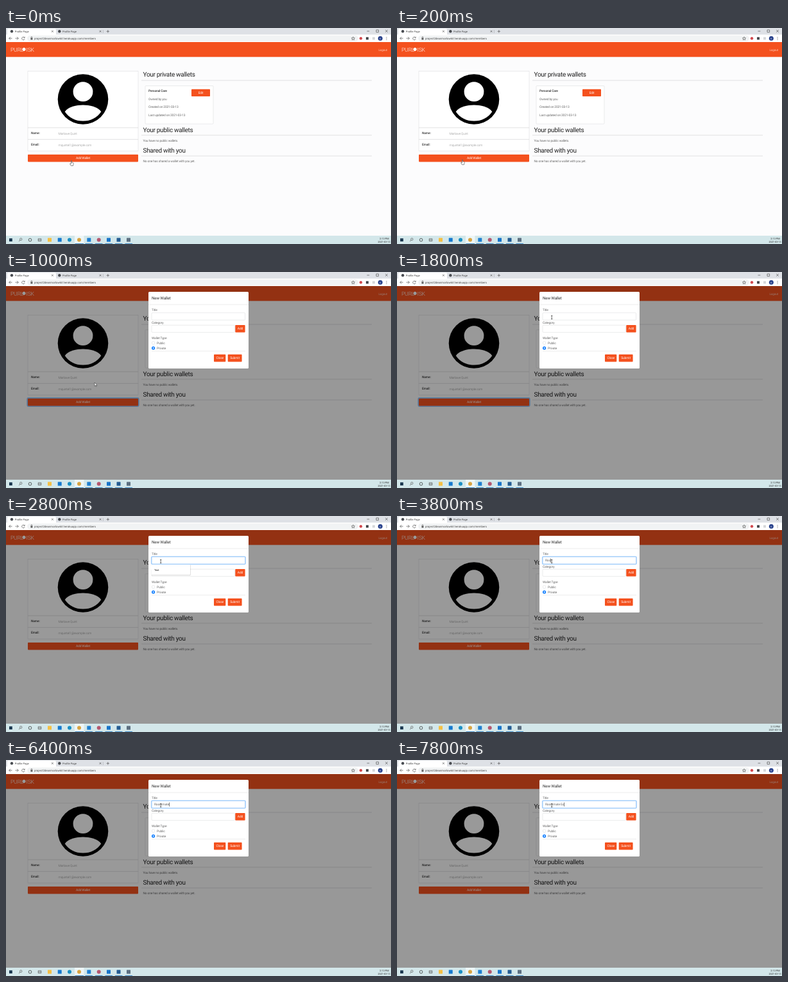
Animation of 600 by 338 pixels, one loop 8 s. Source, as an HTML page:

```html
<!DOCTYPE html>
<html lang="en">
<head>
<meta charset="utf-8">
<title>New wallet</title>
<style>
  html, body { margin: 0; width: 100%; height: 100%; overflow: hidden; background: #fcfcfd; }
  svg { display: block; width: 100vw; height: 100vh; }
  text { font-family: Roboto, "Open Sans", sans-serif; font-size: 4.9px; letter-spacing: -.03em;
    text-rendering: geometricPrecision; fill: #666; white-space: pre; }
  .ui { font-size: 4.2px; letter-spacing: 0; fill: #444; }
  .h { font-size: 10px; fill: #222; }
  .b { fill: #333; font-weight: 500; }
  .pale { fill: #888; font-weight: 300; }
  .w { fill: #fff; text-anchor: middle; }
  .btn { fill: #f4511e; }
  .line { stroke: #d4d4d6; stroke-width: .7; fill: none; }
  .box { fill: #fff; stroke: #dcdde0; stroke-width: .6; }
  .ico { fill: none; stroke: #555; stroke-width: .7; }
</style>
</head>
<body>
<svg viewBox="0 0 600 338" preserveAspectRatio="none">
  <rect width="600" height="338" fill="#fcfcfd"/>

  <g id="page">
    <rect y="22" width="600" height="23.3" class="btn"/>
    <g style="font-size:9px">
      <text x="7" y="37" style="font-size:8.6px;fill:#fff;font-weight:300">PURL</text>
      <circle cx="28" cy="33.3" r="2.6" fill="#fff"/>
      <text x="31.6" y="37" style="font-size:8.6px;fill:#fff;font-weight:300">ISK</text>
    </g>
    <text x="594" y="35.5" text-anchor="end" style="font-size:4.6px;fill:#ffd0c0">Logout</text>

    <rect x="34" y="67.5" width="172" height="125" class="box"/>
    <circle cx="120" cy="111.5" r="39.3"/>
    <circle cx="120" cy="99.7" r="15.4" fill="#fff"/>
    <path d="M91.7 131C97 123 110 120.4 120 120.4S143 123 148.3 131C142 140.5 132 145.6 120 145.6S98 140.5 91.7 131Z" fill="#fff"/>
    <path class="line" d="M34 156H206M34 174.3H206"/>
    <text x="39" y="166" class="b">Name:</text>
    <text x="81.5" y="166.5" class="pale">Marlowe Quint</text>
    <text x="39" y="184" class="b">Email:</text>
    <text x="81.5" y="184.7" class="pale">mquintel1@example.com</text>
    <rect id="ring" x="33.2" y="197.2" width="173.6" height="13" rx="1.6" fill="none" stroke="#268fff" stroke-opacity=".5" stroke-width="1.7"/>
    <rect id="addWallet" x="34" y="198" width="172" height="11.4" rx=".8" class="btn"/>
    <text x="120" y="205.2" class="w">Add Wallet</text>

    <text x="213.5" y="76.3" class="h">Your private wallets</text>
    <rect x="217" y="90.5" width="106" height="59.6" rx="1" class="box"/>
    <text x="222" y="100.2" class="b">Personal Care</text>
    <text x="222" y="112.6">Owned by you</text>
    <text x="222" y="125.2">Created on 2021-03-13</text>
    <text x="222" y="137.6">Last updated on 2021-03-13</text>
    <rect x="289" y="95.7" width="29" height="11.4" rx=".8" class="btn"/>
    <text x="303.5" y="102.9" class="w">Edit</text>
    <text x="213.5" y="162.6" class="h">Your public wallets</text>
    <text x="213.5" y="178.3">You have no public wallets.</text>
    <text x="213.5" y="194.8" class="h">Shared with you</text>
    <text x="213.5" y="210.4">No one has shared a wallet with you yet.</text>
    <path class="line" d="M211 82H570M211 167.8H570M211 200.2H570"/>
  </g>

  <g id="modal">
    <rect y="22" width="600" height="303" opacity=".4"/>
    <rect x="222" y="31" width="156" height="120" rx="1.5" fill="#fff"/>
    <text x="227" y="43.1" style="font-size:6.3px;fill:#333">New Wallet</text>
    <path class="line" d="M222 51H378M227 123.8H373" stroke-opacity=".7"/>
    <text x="227" y="61.2">Title</text>
    <text x="227" y="80.6">Category</text>
    <rect x="227" y="63.8" width="145.6" height="11.4" rx="1" class="box"/>
    <rect x="227" y="83.2" width="129.5" height="11.2" rx="1" class="box"/>
    <rect x="357.3" y="83" width="15.3" height="11.5" rx=".8" class="btn"/>
    <text x="365" y="90.3" class="w">Add</text>
    <text x="227" y="104.9">Wallet Type</text>
    <circle cx="229.6" cy="111" r="2.4" class="box"/>
    <text x="235" y="112.7">Public</text>
    <circle cx="229.6" cy="119" r="2.6" fill="#0b7bff"/>
    <circle cx="229.6" cy="119" r="1" fill="#fff"/>
    <text x="235" y="120.8">Private</text>
    <rect x="324" y="129" width="18.3" height="11.5" rx=".8" class="btn"/>
    <text x="333.2" y="136.4" class="w">Close</text>
    <rect x="345.7" y="129" width="21.9" height="11.5" rx=".8" class="btn"/>
    <text x="356.6" y="136.4" class="w">Submit</text>

    <g id="focus">
      <rect x="226.7" y="63.5" width="146.4" height="12" rx="1.2" fill="#fff" stroke="#bfdeff" stroke-width="1.6"/>
      <rect x="227" y="63.8" width="145.8" height="11.4" rx="1" fill="#fff" stroke="#6fb0f5" stroke-width=".7"/>
      <text id="typed" x="231" y="71.3"></text>
      <rect id="caret" y="66.5" width=".6" height="6.2" fill="#222"/>
    </g>
    <g id="hint">
      <rect x="227" y="76.4" width="60.6" height="16.6" rx=".8" fill="#000" opacity=".2"/>
      <rect x="227" y="76" width="60" height="16.3" rx=".8" fill="#fff"/>
      <text x="231" y="85.6" class="ui" style="fill:#111;font-size:4px">Text</text>
    </g>
  </g>

  <g id="browser">
    <rect width="600" height="11" fill="#dee1e6"/>
    <path d="M2 11V3Q2 1 4 1H76Q78 1 78 3V11Z" fill="#fff"/>
    <rect y="10.3" width="600" height="11.7" fill="#fff"/>
    <rect x="33" y="11.8" width="516" height="9" rx="4.5" fill="#f1f3f4"/>
    <circle cx="9" cy="5.3" r="2.2" fill="#4a4d52"/>
    <text x="13.8" y="6.9" class="ui" style="font-size:4.1px">Profile Page</text>
    <circle cx="83.3" cy="5.3" r="2.2" fill="#4a4d52"/>
    <text x="88" y="6.9" class="ui" style="font-size:4.1px">Profile Page</text>
    <path class="ico" d="M71 3.9l2.8 2.8m0-2.8l-2.8 2.8M145.6 3.9l2.8 2.8m0-2.8l-2.8 2.8M156.6 5.3h4.4m-2.2-2.2v4.4M562.5 5h3.8M577 3h3.6v3.6h-3.6ZM591.2 3l3.6 3.6m0-3.6l-3.6 3.6"/>
    <path d="M151.3 3V8" stroke="#9a9da2" stroke-width=".5"/>
    <path class="ico" d="M9.5 16.2H4.7M7 13.9L4.7 16.2L7 18.5M14.5 16.2H19.3M17 13.9L19.3 16.2L17 18.5M28.7 14.8A2.3 2.3 0 1 0 29.2 17M29.2 13.7V15.3H27.5"/>
    <path d="M38.4 15.6h3v2.7h-3z" fill="#555"/>
    <path class="ico" d="M39 15.6v-1a.9.9 0 0 1 1.8 0v1" stroke-width=".5"/>
    <text x="44" y="17.8" class="ui" style="font-size:4.35px">project2deanmarlowkit.herokuapp.com/members</text>
    <path class="ico" stroke-width=".5" d="M541 13.8l.8 1.7 1.8.2-1.3 1.2.3 1.8-1.6-.9-1.6.9.3-1.8-1.3-1.2 1.8-.2Z"/>
    <circle cx="553" cy="16.2" r="2.2" fill="#d24a50"/>
    <rect x="561" y="14.3" width="4" height="4" fill="#44474c"/>
    <rect x="571" y="14.3" width="4" height="4" fill="#d5d7da"/>
    <circle cx="583.3" cy="16.2" r="3.5" fill="#27408b"/>
    <text x="583.3" y="17.5" class="w" style="font-size:3.6px">K</text>
    <path d="M593 14v.9m0 1v.9m0 1v.9" stroke="#555" stroke-width=".9"/>
  </g>

  <g id="taskbar">
    <rect y="325" width="600" height="13" fill="#d3e7ea"/>
    <rect x="107" y="325" width="14.5" height="13" fill="#edf6f7"/>
    <rect x="5" y="329.2" width="4.8" height="4.8" fill="#1b3850"/>
    <circle cx="23.2" cy="330.6" r="1.7" class="ico"/>
    <path class="ico" d="M22 331.9l-2 2.1M50.2 329.7h4.6v3.8h-4.6zM50.2 331.6h4.6"/>
    <circle cx="37.5" cy="331.6" r="2.3" class="ico" style="stroke:#222"/>
    <g id="apps"></g>
    <path d="M107.5 337.5H121M123.5 337.5H135M139 337.5H150.5M154.5 337.5H166M170 337.5H181.5M185.5 337.5H197" stroke="#2f82c4" stroke-width=".9"/>
    <text x="589.5" y="330.6" text-anchor="middle" class="ui" style="font-size:3.9px;fill:#222">2:13 PM</text>
    <text x="589" y="336.2" text-anchor="middle" class="ui" style="font-size:3.8px;fill:#222">2021-03-13</text>
  </g>

  <g id="pointer" stroke="#222" stroke-width=".5" fill="#fff" stroke-linejoin="round">
    <path id="hand" d="M-.6 -2.6Q0 -3.2 .5 -2.6V.2L2.7 .8Q3.3 1 3.2 1.8L2.5 5.2H-.7L-2.4 2.4Q-2.4 1.4 -1.3 1.9L-.6 2.4Z"/>
    <path id="arrow" d="M0 0V5.6L1.3 4.4L2.2 6.4L3.1 6L2.2 4.1H4Z"/>
    <path id="beam" d="M-1.2 -2.6H1.2M0 -2.6V2.6M-1.2 2.6H1.2" stroke-width=".65"/>
  </g>
</svg>

<script>
  const el = id => document.getElementById(id);
  const show = (id, on) => el(id).setAttribute("visibility", on ? "inherit" : "hidden");

  const LOOP = 8000, STEP = 200;
  const OPEN = 400, MOVE = 800, ARRIVE = 1800, FOCUS = 2000, HINT = 2400;
  const TEXT = "Roommate Ex";
  const KEYS = [3200, 3600, 3800, 4200, 4600, 5200, 5800, 6200, 6600, 7200, 7600];

  const apps = [
    [68, "#f5c044"], [83.7, "#1479cf"], [99, "#1b8fc4", 1], [114, "#d9a441", 1], [129.3, "#1f7fd0"],
    [144.7, "#b5576f", 1], [160, "#1874c9"], [175.5, "#235b92"], [191, "#5c6f80"]
  ];
  el("apps").innerHTML = apps.map(([x, color, round]) =>
    `<rect x="${x - 3}" y="328.6" width="6" height="6" rx="${round ? 3 : .5}" fill="${color}"/>`).join("");

  function drawPointer(t) {
    const u = Math.min(1, Math.max(0, (t - MOVE + STEP) / (ARRIVE - MOVE + STEP)));
    const k = u * u * (3 - 2 * u);
    const x = 102 + 139.2 * k;
    const y = (t < STEP ? 210.3 : 208.6) + (71 - 208.6) * k;
    el("pointer").setAttribute("transform", `translate(${x} ${y})`);
    show("hand", u === 0);
    show("arrow", u > 0 && u < 1);
    show("beam", u === 1);
  }

  function drawTyping(t) {
    const count = KEYS.filter(key => key <= t).length;
    const last = count ? KEYS[count - 1] : FOCUS;
    const typed = el("typed");
    typed.textContent = TEXT.slice(0, count);
    el("caret").setAttribute("x", 231.2 + (count ? typed.getComputedTextLength() : 0));
    show("caret", (t - last) % 1200 < 800);
    show("hint", t >= HINT && !count);
  }

  function draw(time) {
    const t = Math.floor((time % LOOP) / STEP) * STEP;
    show("modal", t >= OPEN);
    show("ring", t >= OPEN && t < FOCUS);
    show("focus", t >= FOCUS);
    drawTyping(t);
    if (t < FOCUS) show("caret", false);
    drawPointer(t);
  }

  const start = performance.now();
  function tick() {
    draw(performance.now() - start);
    requestAnimationFrame(tick);
  }
  tick();
</script>
</body>
</html>
```
